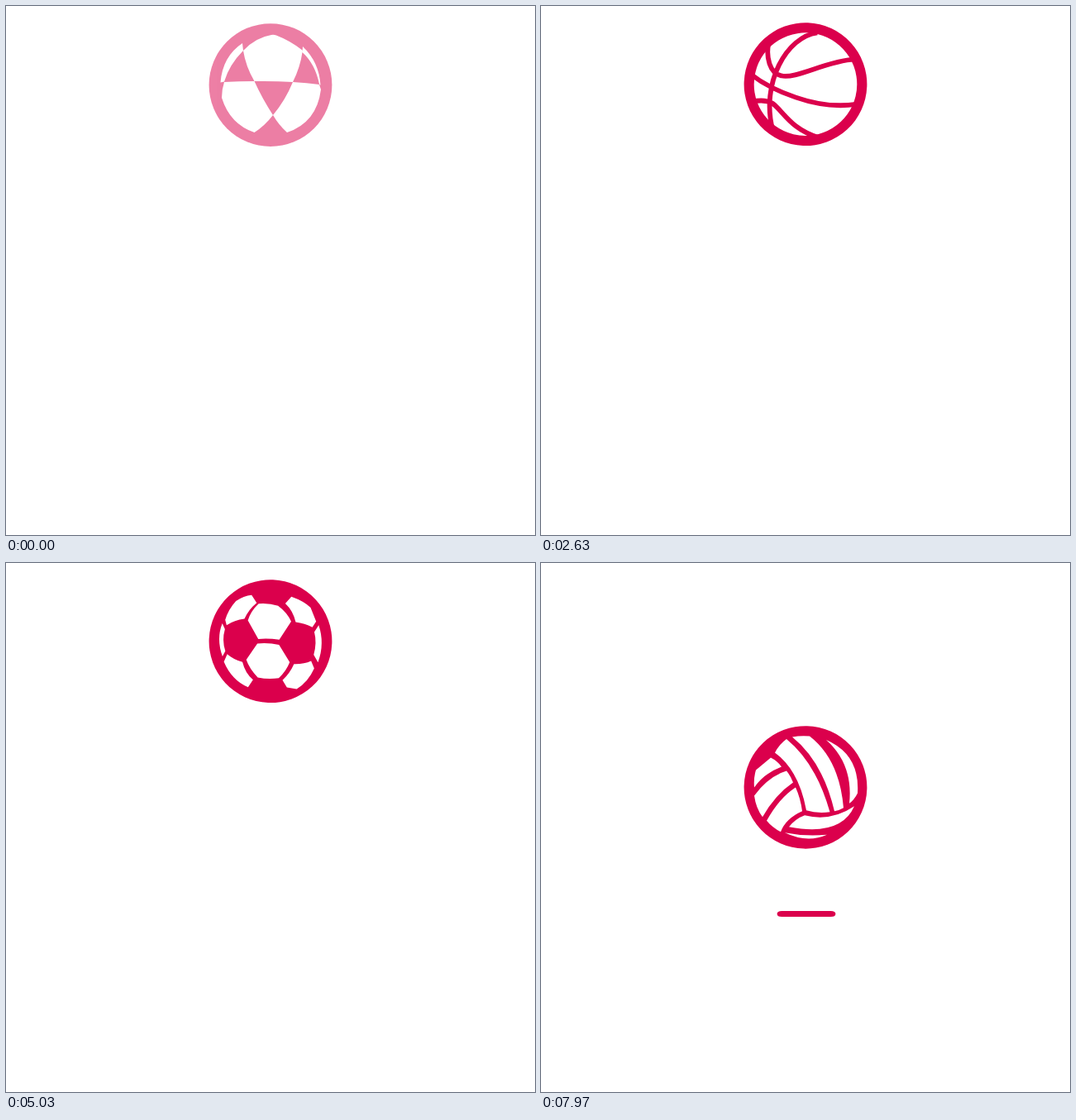
Animation, 640 px wide and 640 px high, one loop 8000 ms. Source, as an HTML page:

```html
<!DOCTYPE html>
<html lang="en">
<head>
<meta charset="utf-8">
<title>Bouncing balls</title>
<style>
html, body { margin: 0; width: 100%; height: 100%; overflow: hidden; background: #fff; }
svg { display: block; width: 100vw; height: 100vh; }
.disc { fill: #db004c; }
.panel { fill: #fff; }
.seam { fill: none; stroke: #db004c; stroke-width: 5.8; }
#shadow { fill: none; stroke: #db004c; }
</style>
</head>
<body>
<svg viewBox="0 0 640 640">
  <rect id="shadow"/>
  <g id="balls"></g>
</svg>
<script>
const LOOP = 8000, STEP = 40, CYCLE = 2400, RADIUS = 74.4;
const PEAK_Y = 93.2, GROUND_Y = 424.5;

// Each drawing is given around its own centre, at the turn (degrees) it was drawn in.
const BALLS = [
  { // beach ball
    cy: 95.6, turn: 0,
    panels: `M286,45 Q262,61 259.5,92.5 L264,91.5 Q270,71 287,54Z
      M359,49 Q379,68 380.5,96 L379,94.5 Q374,70 358.5,56Z
      M287,54 Q302,38 321,35 Q324,34.5 327,35.5 Q344,42 358.5,53.5 L358.5,56 Q356,74 347,92 Q324,90.5 300.5,91 Q290,73 287,54Z
      M264,92 Q282,91 300.5,91 Q310,112 323,132 Q313,145 300.5,153 Q271,143 261,111 Q261,101 264,92Z
      M347,92 Q364,93 379,95 L381,101 Q376,141 340,153 Q330,144 323,132 Q338,114 347,92Z`
  },
  { // basketball
    cy: 172, turn: 294, hole: 62.3,
    seams: `M331,107 Q343,140 338,180 Q334,215 322,239
      M256,171 C268,206 330,226 383,199
      M278,120 C287,153 317,185 316,203 C316,217 298,226 280,226
      M380,142 C377,178 358,191 351,206 C349,213 350,222 354,230`
  },
  { // football
    cy: 172, turn: 294,
    panels: `M291.5,152.5 L316,162 Q317,176 320.5,187 L301,204 Q289,203 278.5,195.5 Q275,184 276,172 Q282,159 291.5,152.5Z
      M322,161 L340,144 Q352,146 361.5,153 Q366,165 366,178 Q358,190 348,196 L326,187 Q322,174 322,161Z
      M262,158.5 Q264,143 270,133 L285,123 L293,126 Q290,136 291,147 Q278,153 271.5,164Z
      M289,119 Q309,107 333,110.5 L325,117.5 Q310,116.5 298,122.5Z
      M333,119 L341,113.5 Q358,117 370,129 L370.5,141 L363,148 Q353,141 341,138.5 Q339,127 333,119Z
      M370,183 L380,187 Q376,208 356,222 L346,220 Q351,211 351.5,200 Q364,194 370,183Z
      M270,206 L278,198 Q288,206 300,208.5 Q304,220 312,228 L306,231 Q293,230 281,223 Q273,215 270,206Z
      M311,233.5 Q331,237 350,225 L343,223 Q331,230 317,229Z`
  },
  { // volleyball
    cy: 271, turn: 114,
    panels: `M283,229 Q288,219 297,212.5 Q333,242 349.5,301 Q334,303 321,299 Q312,250 283,229Z
      M304,210 Q314,208 325,209 Q361,237 366,296 Q361,299 355,300 Q341,240 304,210Z
      M345,213.5 Q386,231 383,278 Q379,286 373,290.5 Q378,243 345,213.5Z
      M260,250 L278,235 Q286,239 291,246 Q270,254 258,271 Q257,260 260,250Z
      M297,251 Q302,257 305,265 Q283,280 268,307 Q260,296 258,281 Q275,258 297,251Z
      M308,271 Q314,284 316,300 Q296,309 290,325 Q280,320 273,311.5 Q288,284 308,271Z
      M319,305 Q351,313 379,294 Q363,331 300,319 Q308,309 319,305Z
      M295,326 Q320,331 346,328.5 Q322,339 295,326Z`
  }
];

// Drop below the highest point: time, distance, speed.
const DROP = [
  [-440, 79, -.3], [0, 2.4, -.045], [110, 0, 0], [180, 0, 0], [360, 17, .22],
  [760, 178.2, .39], [880, 221, .32], [1200, 287, 0], [1680, 165.5, -.31],
  [1960, 79, -.3], [2400, 2.4, -.045]
];

const clamp = x => Math.min(1, Math.max(0, x));
const ease = (t, from, to) => {
  const s = clamp((t - from) / (to - from));
  return s * s * (3 - 2 * s);
};

function drop(t) {
  const i = Math.max(1, DROP.findIndex(k => t <= k[0]));
  const [t0, y0, v0] = DROP[i - 1], [t1, y1, v1] = DROP[i];
  const d = t1 - t0, s = (t - t0) / d, r = 1 - s;
  return r * r * ((1 + 2 * s) * y0 + s * d * v0) + s * s * ((3 - 2 * s) * y1 - r * d * v1);
}

const ballsNode = document.getElementById('balls');
const shadow = document.getElementById('shadow');

ballsNode.innerHTML = BALLS.map(b => `<g>
  <circle class="disc" r="${RADIUS}"/>
  ${b.hole ? `<circle class="panel" r="${b.hole}"/>` : ''}
  <g transform="rotate(${-b.turn}) translate(-320 ${-b.cy})">
    <path class="panel" d="${b.panels || ''}"/><path class="seam" d="${b.seams || ''}"/>
  </g></g>`).join('');
const nodes = [...ballsNode.children];

function drawShadow(t) {
  const size = ease(t, 365, 1200) * (1 - ease(t, 1200, 2100));
  const stroke = .6 + 6.4 * size;
  const w = Math.max(0, 154 * size - stroke), h = 4.9 + 4.7 * size - stroke;
  const attrs = { x: 321 - w / 2, y: GROUND_Y - h / 2, width: w, height: h, rx: 4, ry: h / 2, 'stroke-width': stroke };
  for (const name in attrs) shadow.setAttribute(name, attrs[name]);
  shadow.style.display = size > .005 ? '' : 'none';
}

function draw(ms) {
  const time = Math.floor((ms % LOOP + 17) / STEP) * STEP;
  const current = Math.floor((time + 40) / CYCLE);
  const t = time - current * CYCLE;
  const squash = 1 - .4 * ease(t, 745, 1090) * (1 - ease(t, 1200, 1580));
  nodes.forEach((node, i) => {
    node.style.display = i === current ? '' : 'none';
  });
  const node = nodes[current];
  node.setAttribute('opacity', Math.min(clamp((t + 40) / 80), clamp((2360 - t) / 80)));
  node.setAttribute('transform',
    `translate(320 ${PEAK_Y + drop(t)}) scale(1 ${squash}) rotate(${t * 360 / CYCLE})`);
  drawShadow(t);
}

const start = performance.now();
function tick() {
  draw(performance.now() - start);
  requestAnimationFrame(tick);
}
tick();
</script>
</body>
</html>
```
